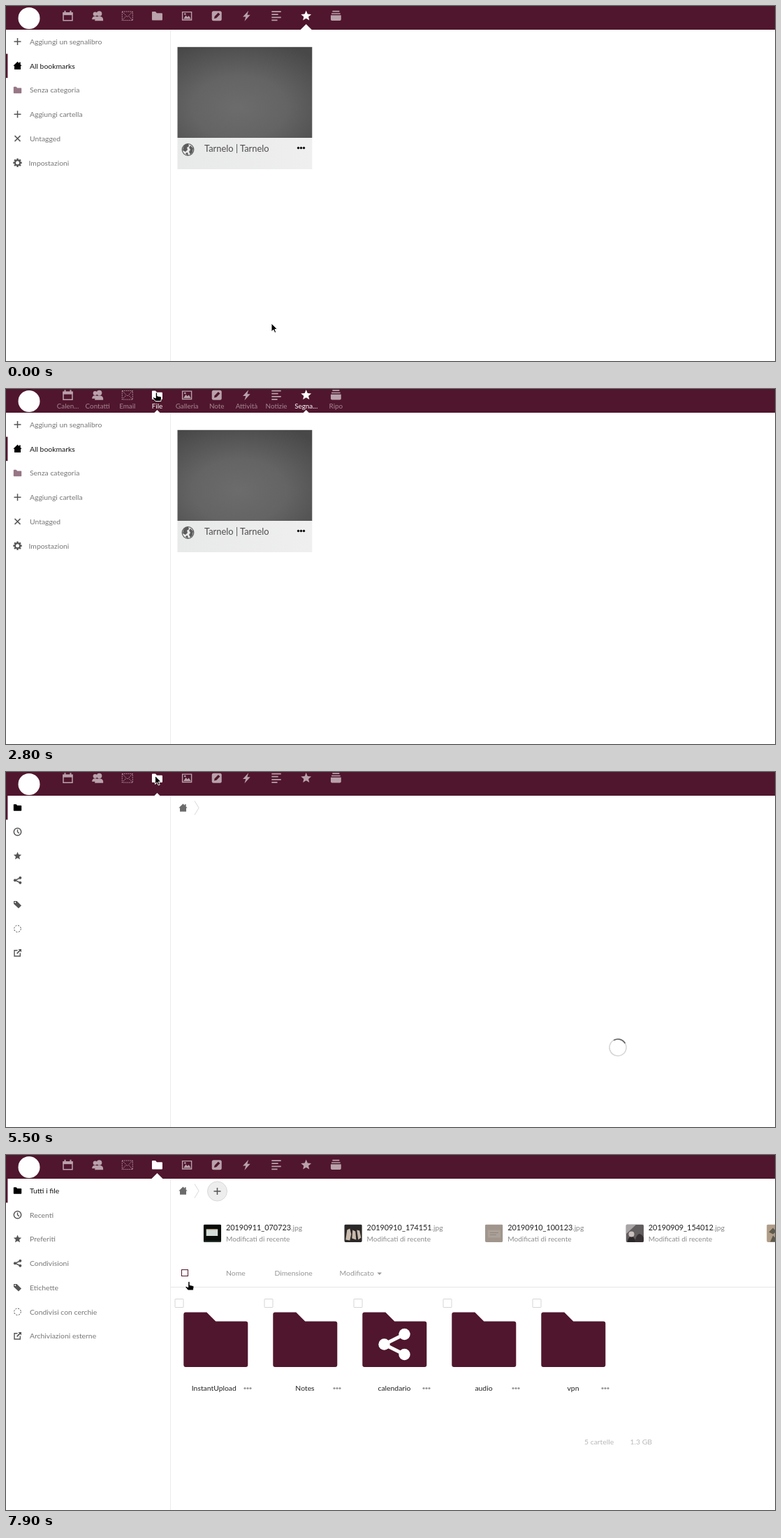
Recreate the animation shown at these times as an HTML page. Size 1101 by 509 pixels, loop 8 s.

```html
<!DOCTYPE html>
<html lang="it">
<head>
<meta charset="utf-8">
<title>Segnalibri e file</title>
<style>
  html, body { margin: 0; width: 100%; height: 100%; overflow: hidden; background: #fff; }
  svg { display: block; width: 1101px; height: 509px; }
  text { font-family: Lato, "Open Sans", sans-serif; font-size: 10.4px; }
  .label { font-size: 9.9px; }
  .title { font-size: 12.9px; }
  .name { font-size: 10.85px; }
  .sub { font-size: 10.1px; }
</style>
</head>
<body>
<svg id="stage" viewBox="0 0 1101 509"></svg>
<script>
const LOOP = 8000, STEP = 100;
const WINE = '#50162d', GREY = '#777';

const text = (x, y, s, fill = GREY, extra = '') => `<text x="${x}" y="${y}" fill="${fill}" ${extra}>${s}</text>`;
const rect = (x, y, w, h, fill, extra = '') => `<rect x="${x}" y="${y}" width="${w}" height="${h}" fill="${fill}" ${extra}/>`;
const path = (d, extra = '') => `<path d="${d}" ${extra}/>`;
const dot = (x, y, r, extra = '') => `<circle cx="${x}" cy="${y}" r="${r}" ${extra}/>`;
const at = (x, y, body, extra = '') => `<g transform="translate(${x} ${y})" ${extra}>${body}</g>`;
const group = (id, body, extra = '') => `<g id="${id}" ${extra}>${body}</g>`;
const line = (w = 1.5, color = 'currentColor') => `fill="none" stroke="${color}" stroke-width="${w}"`;
const dots = (x, y, gap, r, fill) => [-gap, 0, gap].map(d => dot(x + d, y, r, `fill="${fill}"`)).join('');

function starPath(r) {
  let d = '';
  for (let i = 0; i < 10; i++) {
    const a = i * Math.PI / 5, k = i % 2 ? r * 0.45 : r;
    d += (i ? 'L' : 'M') + (k * Math.sin(a)).toFixed(2) + ' ' + (-k * Math.cos(a)).toFixed(2);
  }
  return d + 'z';
}

function gear() {
  let teeth = '';
  for (let a = 0; a < 360; a += 45) teeth += rect(-1.2, -6.2, 2.4, 3, 'currentColor', `transform="rotate(${a})"`);
  return dot(0, 0, 3.6, line(2.2)) + teeth;
}

const folder = path('M-7.5-5.2q0-1 1-1h4l2 2.2h7q1 0 1 1v8.2q0 1-1 1h-13q-1 0-1-1z');
const plus = path('M-5 0H5M0-5V5', line(1.5));

const icon = {
  calendar: path('M-6.5-4.5h13v11h-13z', line(1.5)) + rect(-7, -5, 14, 3.8, 'currentColor') + path('M-4-7.5v3M4-7.5v3', line(2)),
  people: dot(-3.5, -2.8, 3) + path('M-8 5q0-4.5 4.5-4.5t3 4.5z') + dot(2.4, -3.3, 3.8) + path('M-4 7q0-6.5 6.4-6.5T8 7z'),
  mail: path('M-7.5-6.3h15v12.6h-15zL0 1.5 7.5-6.3M-7.5 6.3l5-5.5M7.5 6.3l-5-5.5', line(0.9) + ' stroke-dasharray="1.7 1.1"'),
  folder,
  smallFolder: `<g transform="scale(.76)">${folder}</g>`,
  picture: path('M-6.5-5.7h13v11.4h-13z', line(1.4)) + path('M-5 4.3l3.4-5 2.2 2.5 2-2 3 4.5z') + dot(-2.8, -2.8, 1.3),
  edit: rect(-7, -7, 14, 14, 'currentColor', 'rx="2.5"') + path('M-3.8 3.8l.8-3.3 5.2-5.2 2.5 2.5-5.2 5.2z', `fill="${WINE}"`),
  bolt: path('M2.8-7.5L-5.3 1.3h4.2L-2.9 7.5 5.3-1.6H1z'),
  lines: path('M-6.7-6.2H6.7M-6.7-2.1H2.6M-6.7 2H6.7M-6.7 6.1H1.5', line(1.8)),
  star: path(starPath(7.8)),
  stack: path('M-5-6.7H5M-6.3-3.3H6.3', line(1.6)) + path('M-7.4-1H7.4V5q0 1.8-1.8 1.8H-5.6q-1.8 0-1.8-1.8z'),
  plus,
  home: path('M0-6L6.2 0H4.5v5.3h-9V0h-1.7z') + rect(2.4, -5.2, 1.8, 3, 'currentColor'),
  cross: path('M-4-4L4 4M4-4L-4 4', line(1.7)),
  gear: gear(),
  clock: dot(0, 0, 5.2, line(1.5)) + path('M0-3.2V0L2.3 2.2', line(1.4)),
  smallStar: path(starPath(6)),
  share: path('M4-3.5L-3.5 0 4 3.5', line(1.4)) + dot(3.8, -3.6, 2) + dot(-3.6, 0, 2) + dot(3.8, 3.6, 2),
  tag: path('M-5.5-5h4.5L5.5 1.5 1.5 5.5-5.5-1z') + dot(-3.3, -2.9, 1, 'fill="#fff"'),
  ring: dot(0, 0, 4.8, line(1) + ' stroke-dasharray="2.1 1.67"'),
  external: path('M0-3.8h-4.5v8.3h8.3V0', line(1.4)) + path('M1-5.5h4.5V-1L3.8-2.7-.3 1.4-1.5.2 2.6-3.9z'),
};

// Header
const apps = [['calendar', 'Calen...'], ['people', 'Contatti'], ['mail', 'Email'], ['folder', 'File'], ['picture', 'Galleria'],
  ['edit', 'Note'], ['bolt', 'Attività'], ['lines', 'Notizie'], ['star', 'Segna...'], ['stack', 'Ripo']];
const FILES = 3, BOOKMARKS = 8;
const appX = i => 88.5 + 42.65 * i;
const header = rect(0, 0, 1101, 34, WINE) + dot(33, 17.5, 15.5, 'fill="#fff"') +
  apps.map(([name, label], i) => group('app' + i,
    group('icon' + i, icon[name], 'fill="currentColor"') +
    text(appX(i), 28, label, '#fff', `id="label${i}" class="label" text-anchor="middle"`) +
    path('M0 0', `id="mark${i}" fill="#fff"`), 'color="#fff"')).join('') +
  group('busy', dot(0, 0, 6.4, line(1.3, '#fff') + ' opacity=".15"') +
    path('M-4.5-4.5A6.4 6.4 0 0 1 4.5-4.5', line(1.3, '#fff') + ' opacity=".7"'));

// Sidebars
const rowY = i => 51 + 34.75 * i;
function sidebar(key, rows, active) {
  return rows.map(([name, label, color = '#555', x = 34], i) =>
    rect(0, rowY(i) - 17.2, 2.4, 34.6, WINE, `id="${key}Bar${i}"`) +
    at(16.5, rowY(i), icon[name], `fill="currentColor" color="${i === active ? '#000' : color}"`) +
    text(x, rowY(i) + 3.8, label, GREY, `id="${key}Row${i}" class="${key}Text"`)).join('');
}
const markRows = [['plus', 'Aggiungi un segnalibro'], ['home', 'All bookmarks'], ['smallFolder', 'Senza categoria', '#977685'],
  ['plus', 'Aggiungi cartella'], ['cross', 'Untagged'], ['gear', 'Impostazioni', '#555', 32.5]];
const fileRows = [['smallFolder', 'Tutti i file'], ['clock', 'Recenti'], ['smallStar', 'Preferiti'], ['share', 'Condivisioni'],
  ['tag', 'Etichette'], ['ring', 'Condivisi con cerchie'], ['external', 'Archiviazioni esterne']];

// Bookmark card
const card = rect(245.5, 58.8, 192.8, 130.2, 'url(#photo)') + rect(245.5, 189, 192.8, 45, 'url(#caption)') +
  dot(260.5, 206, 8.3, line(1.2, '#5c5c5c')) +
  path('M254 202q3-5 7-4l1 3-3 2 1 3-3 3-4-2zM264 200l4 4-1 6-3 3-2-4 2-3-2-3zM257 211l3-1 1 4-3-1z', 'fill="#5c5c5c"') +
  text(284, 209, 'Tarnelo | Tarnelo', '#4d4d4d', 'class="title"') + dots(422.5, 203.5, 4, 1.7, '#111');

// File list
const photo = (color, body) => rect(0, 0, 25.5, 25.5, color) + body;
const thumbs = [
  photo('#0a0c0a', rect(4, 7.5, 16.5, 9, '#d3dcd7') + rect(4, 6.7, 16.5, 1.3, '#c9b49a') + rect(0, 23.5, 25.5, 2, '#25352c')),
  photo('#2b2828', path('M2 22l2-14 4-2 2 8-2 9zM11 20l1-12 4 2 1 12zM18 8l4 1 2 10-4 3z', 'fill="#c9bbad"')),
  photo('#a1968d', rect(4, 8, 18, 11, '#aba199') + path('M7 12h12M7 15h9', 'stroke="#8f857d"')),
  photo('#625d5e', path('M0 0h15L0 14z', 'fill="#a9a5a6"') + path('M2 25.5q1-7 6-9 5 2 6 9z', 'fill="#2c282a"') +
    dot(8, 14, 4, 'fill="#c9c0be"') + path('M13 25.5q1-10 6-12 5 1 6.5 6v6z', 'fill="#383234"')),
  photo('#b09d88', path('M3 11l6-6 5 5-5 4zM5 25l4-9 9 9z', 'fill="#5e5a4d"')),
];
const names = ['20190911_070723', '20190910_174151', '20190910_100123', '20190909_154012'];
const colX = i => 282.7 + 201.6 * i;
const thumbRow = thumbs.map((t, i) => at(colX(i), 99.5, t, 'clip-path="url(#thumb)"')).join('');
const recent = names.map((n, i) =>
  text(colX(i) + 32.3, 108, `${n}<tspan fill="#888" font-size="10.3">.jpg</tspan>`, '#222', 'class="name"') +
  text(colX(i) + 32.3, 124, 'Modificati di recente', '#8c8c8c', 'class="sub"')).join('');
const folders = ['InstantUpload', 'Notes', 'calendario', 'audio', 'vpn'].map((n, i) => at(128 * i, 0,
  rect(242, 206.5, 12, 12, '#fff', 'stroke="#d6d6d6" rx=".5"') +
  path('M254.3 228.5q0-3 3-3h30l13 13h43q3 0 3 3V301q0 3-3 3h-86q-3 0-3-3z', `fill="${WINE}"`) +
  text(i ? 300 : 297.8, 338, n, '#222', 'text-anchor="middle"') + dots(346, 334.5, 4, 1.6, '#999'))).join('');
const bigShare = path('M570.5 257L541.5 271.5 570.5 286', line(5, '#fff')) +
  [[541.5, 271.5], [570.5, 257], [570.5, 286]].map(([x, y]) => dot(x, y, 8.2, 'fill="#fff"')).join('');
const list = dot(302.5, 52, 14, 'fill="#ededed" stroke="#d9d9d9"') + at(302.5, 52, plus, 'color="#555"') + recent +
  rect(251.5, 164.5, 9, 9, '#fff', 'id="selectAll"') +
  text(315, 172.5, 'Nome', '#959595') + text(384.5, 172.5, 'Dimensione', '#959595') + text(477.5, 172.5, 'Modificato', '#959595') +
  path('M531.5 168.5h6.5l-3.25 3.5z', 'fill="#999"') + rect(236, 189, 865, 1, '#e6e6e6') +
  folders + bigShare + text(828, 414.5, '5 cartelle', '#b8b8b8') + text(893.5, 414.5, '1.3 GB', '#b8b8b8');

const outline = 'stroke="#fff" stroke-width="1" stroke-linejoin="round"';
document.getElementById('stage').innerHTML = `<defs>
  <radialGradient id="photo" cx=".46" cy=".67" r=".78"><stop offset="0" stop-color="#6c6c6c"/><stop offset=".45" stop-color="#646464"/><stop offset="1" stop-color="#484848"/></radialGradient>
  <linearGradient id="caption"><stop offset="0" stop-color="#e8e9e9"/><stop offset="1" stop-color="#efefef"/></linearGradient>
  <clipPath id="thumb"><rect width="25.5" height="25.5" rx="2"/></clipPath></defs>` +
  rect(0, 0, 1101, 509, '#fff') + header + rect(235, 34, 1, 475, '#ebebeb') +
  group('bookmarks', sidebar('mark', markRows, 1) + card) +
  group('fileMenu', sidebar('file', fileRows, 0)) +
  group('crumbs', at(253.5, 51.5, icon.home, 'fill="#6b6b6b" color="#6b6b6b"') + path('M270 41.5l6 10-6 10', line(1, '#d8d8d8'))) +
  group('thumbs', thumbRow) + group('list', list) +
  group('spinner', dot(0, 0, 12, line(1.6, '#d6d6d6')) + path('M-8.5-8.5A12 12 0 0 1 8.5-8.5', line(1.6, '#666'))) +
  group('arrow', path('M0 0V12L2.8 9.4 4.8 13.5 6.7 12.6 4.9 8.6H8.6z', outline)) +
  group('hand', path('M-1.3 1q0-1 1.2-1t1.3 1v4l4.8.9q1.2.3 1 2L6.3 12.5H-1.5L-5 8.3q-.5-1.3.8-1.5L-1.3 8z', outline));

const el = id => document.getElementById(id);
const set = (id, attrs) => { for (const k in attrs) el(id).setAttribute(k, attrs[k]); };
const show = (id, on) => set(id, { display: on ? 'inline' : 'none' });
const ramp = (t, a, b) => Math.min(1, Math.max(0, (t - a) / (b - a)));
const within = (t, a, b) => t >= a && t < b;

// time, x, y
const route = [[0, 380, 455], [400, 429, 250], [700, 340, 85], [800, 290, 67], [900, 249, 115], [1300, 237.5, 70],
  [1500, 225, 48], [1800, 214, 1], [2300, 214, 1], [2400, 216, 1], [2700, 216, 1], [2800, 215.5, 5], [4900, 215.5, 5],
  [5000, 213.5, 5.5], [6200, 213.5, 5.5], [6300, 212, 13], [6600, 212, 13], [7100, 213, 35], [7400, 214, 58],
  [7500, 224, 88], [7600, 240, 130], [7700, 265, 183], [7800, 265, 183], [7900, 262, 181.5], [LOOP, 262, 181.5]];
function pointer(t) {
  const i = route.findIndex(k => k[0] > t), [t0, x0, y0] = route[i - 1], [t1, x1, y1] = route[i];
  const k = (t - t0) / (t1 - t0);
  return `translate(${x0 + (x1 - x0) * k} ${y0 + (y1 - y0) * k})`;
}

// The header spinner stutters while the next page is fetched.
const ticks = [...Array.from({ length: 10 }, (_, i) => 3300 + 100 * i), 4400, 4500, 4700, 4800, 5000];

function hoverRow(key, rows, active, hovered) {
  rows.forEach((_, i) => {
    const lit = i === active || i === hovered;
    show(key + 'Bar' + i, lit);
    set(key + 'Row' + i, { fill: lit ? '#111' : GREY });
  });
}

function drawHeader(t, left, loaded) {
  const busy = within(t, 3300, 5100), hovering = within(t, 1700, 7300);
  const lift = t < 5000 ? ramp(t, 1500, 2200) : 1 - ramp(t, 7100, 7400);
  const current = left ? FILES : BOOKMARKS, size = 8 - 4 * lift;
  apps.forEach((_, i) => {
    const x = appX(i), lit = i === current || (i === FILES && hovering);
    set('app' + i, { opacity: lit ? 1 : 0.6 });
    set('icon' + i, { transform: `translate(${x} ${14.3 - 5.5 * lift})` });
    show('icon' + i, !(busy && i === FILES));
    set('label' + i, { opacity: left && !loaded ? 0 : lift * (lit ? 1 : 0.8) });
    set('mark' + i, { d: lit ? `M${x - size} 34L${x} ${34 - size}L${x + size} 34z` : 'M0 0' });
  });
  show('busy', busy);
  set('busy', { transform: `translate(216.5 9.5) rotate(${45 * ticks.filter(k => k <= t).length})` });
}

function draw(time) {
  const t = Math.floor(time / STEP) * STEP;
  const left = t >= 5100, loaded = t >= 6600;
  drawHeader(t, left, loaded);

  show('bookmarks', !left);
  show('fileMenu', t >= 5200);
  show('crumbs', t >= 5400);
  hoverRow('mark', markRows, 1, t === 1500 ? 0 : -1);
  hoverRow('file', fileRows, 0, t === 7500 ? 1 : -1);
  document.querySelectorAll('.fileText').forEach(n => n.setAttribute('opacity', loaded ? 1 : 0));
  set('thumbs', { opacity: ramp(t, 6100, 6900) });
  show('list', loaded);
  set('selectAll', { stroke: t >= 7700 ? WINE : '#555' });
  show('spinner', within(t, 5400, 6600));
  set('spinner', { transform: `translate(876 395) rotate(${60 + (t - 6400) * 0.45})` });

  const hand = within(t, 2400, 5000) || within(t, 6300, 7600) || t >= 7900;
  show('hand', hand);
  show('arrow', !hand);
  set(hand ? 'hand' : 'arrow', { transform: pointer(t) });
}

const start = performance.now();
function frame() {
  draw((performance.now() - start) % LOOP);
  requestAnimationFrame(frame);
}
frame();
</script>
</body>
</html>
```
